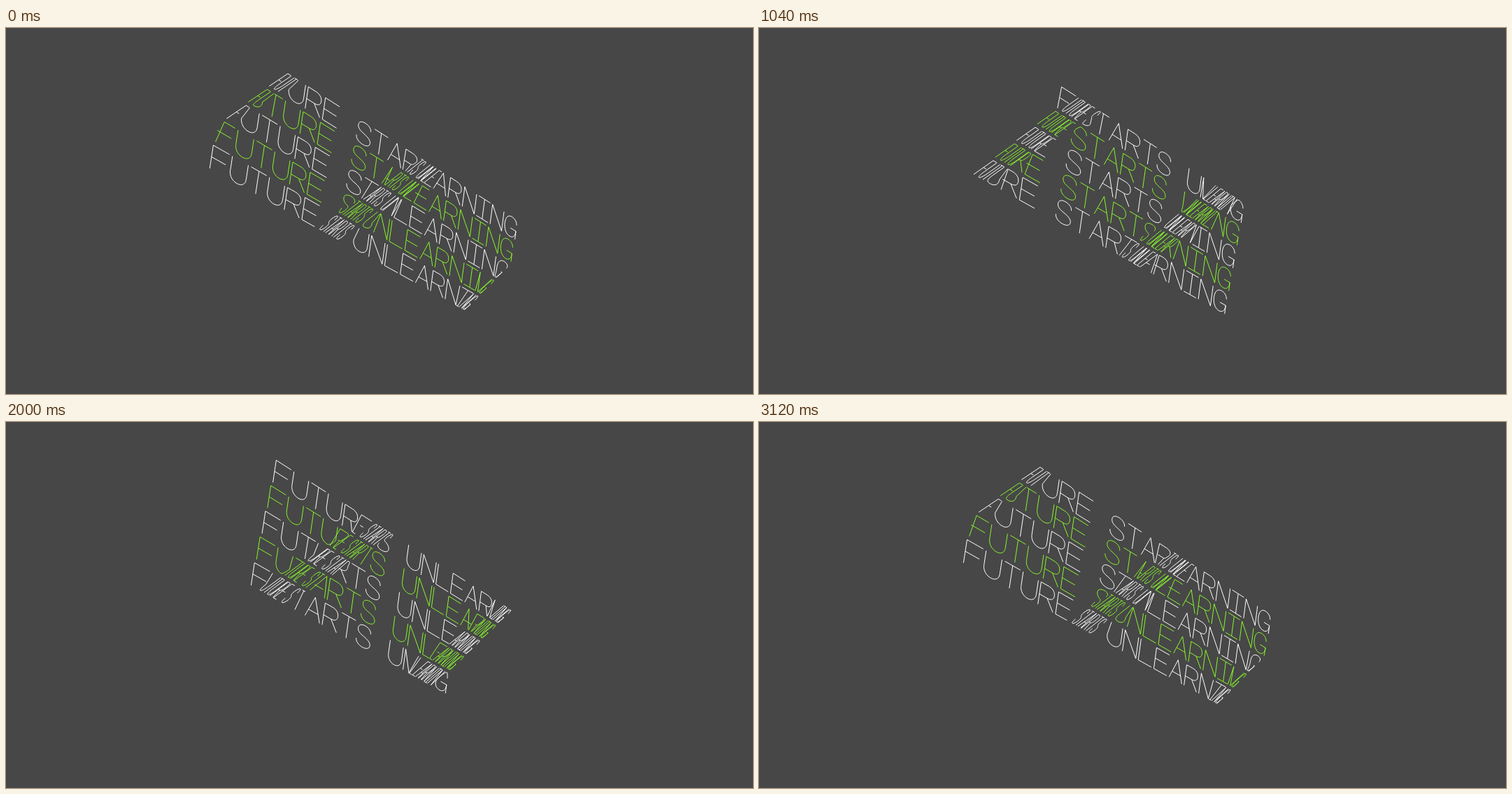
Animation, 1068 px wide and 524 px high, one loop 3.14 s. Source, as an HTML page with a canvas:

```html
<!DOCTYPE html>
<html lang="en">
<head>
<meta charset="utf-8">
<title>Future starts unlearning</title>
<style>
  html, body { margin: 0; width: 100%; height: 100%; overflow: hidden; background: #474747; }
  canvas { display: block; }
</style>
</head>
<body>
<canvas id="stage" width="1068" height="524" role="img" aria-label="FUTURE STARTS UNLEARNING"></canvas>
<script>
const ctx = document.getElementById('stage').getContext('2d');
const W = 1068, H = 524;
const TEXT = 'FUTURE STARTS UNLEARNING';
const COLORS = ['#ffffff', '#88f52c'];
const ROWS = 5, PERIOD = 3140;

// Layout on the tilted plane
const LEFT = -200, TOP = -97.7, ADVANCE = 16, ROW_PITCH = 33.4;
const GLYPH_W = 13.5, GLYPH_H = 28.2;

// Travelling wave that shifts points along the text direction
const AMPLITUDE = 40, WAVELENGTH = 240, ROW_PHASE = 0.0709, START = 46;

// Camera
const FOCAL = H / 2 / Math.tan(Math.PI / 6);
const TURN = 0.2, TILT = Math.PI / 6;
const sinTurn = Math.sin(TURN), cosTurn = Math.cos(TURN);
const sinTilt = Math.sin(TILT), cosTilt = Math.cos(TILT);

// Single-line letters in a unit box
const GLYPHS = {
  F: 'M1 0 L0 0 L0 1 M0 .5 L.87 .5',
  U: 'M0 0 L0 .63 C0 .86 .22 1 .5 1 C.78 1 1 .86 1 .63 L1 0',
  T: 'M0 0 L1 0 M.5 0 L.5 1',
  R: 'M0 1 L0 0 L.52 0 C.82 0 .95 .12 .95 .27 C.95 .43 .82 .54 .52 .54 L0 .54 M.52 .54 L1 1',
  E: 'M1 0 L0 0 L0 1 L1 1 M0 .5 L.88 .5',
  S: 'M.95 .24 C.95 .09 .75 0 .5 0 C.23 0 .04 .1 .04 .25 C.04 .41 .22 .46 .5 .5 ' +
     'C.8 .55 1 .61 1 .76 C1 .91 .77 1 .5 1 C.22 1 0 .9 0 .74',
  A: 'M0 1 L.5 0 L1 1 M.17 .66 L.83 .66',
  N: 'M0 1 L0 0 L1 1 L1 0',
  L: 'M0 0 L0 1 L1 1',
  I: 'M0 0 L1 0 M.5 0 L.5 1 M0 1 L1 1',
  G: 'M1 .27 C.97 .1 .77 0 .53 0 C.2 0 0 .2 0 .5 C0 .8 .2 1 .53 1 C.8 1 1 .85 1 .58 ' +
     'M.52 .58 L1 .58 L1 1'
};

for (const letter in GLYPHS) {
  GLYPHS[letter] = GLYPHS[letter].match(/[MLC][^MLC]+/g)
    .map(part => [part[0], part.slice(1).trim().split(/\s+/).map(Number)]);
}

const METHODS = { M: 'moveTo', L: 'lineTo', C: 'bezierCurveTo' };

// Triangle wave, period 1, peak 1 at phase 0.25
function triangle(phase) {
  const p = phase + 0.25 - Math.floor(phase + 0.25);
  return 1 - 4 * Math.abs(p - 0.5);
}

function project(x, y) {
  const px = x * cosTilt - y * sinTilt;
  const py = x * sinTilt + y * cosTilt;
  const scale = FOCAL / (FOCAL + px * sinTurn);
  return [W / 2 + px * cosTurn * scale, H / 2 + py * scale];
}

function place(column, row, gx, gy, time) {
  const u = column * ADVANCE + gx * GLYPH_W;
  const phase = (time - START) / PERIOD - u / WAVELENGTH - (row + gy) * ROW_PHASE;
  return project(LEFT + u + AMPLITUDE * triangle(phase), TOP + row * ROW_PITCH + gy * GLYPH_H);
}

function addLetter(letter, column, row, time) {
  for (const [command, values] of GLYPHS[letter] || []) {
    const points = [];
    for (let i = 0; i < values.length; i += 2) {
      points.push(...place(column, row, values[i], values[i + 1], time));
    }
    ctx[METHODS[command]](...points);
  }
}

function draw(now) {
  const time = now % PERIOD;
  ctx.fillStyle = '#474747';
  ctx.fillRect(0, 0, W, H);
  ctx.lineWidth = 1;
  ctx.lineJoin = 'round';
  for (let row = 0; row < ROWS; row++) {
    ctx.strokeStyle = COLORS[row % 2];
    ctx.beginPath();
    [...TEXT].forEach((letter, column) => addLetter(letter, column, row, time));
    ctx.stroke();
  }
}

function loop() {
  draw(performance.now());
  requestAnimationFrame(loop);
}
loop();
</script>
</body>
</html>
```
